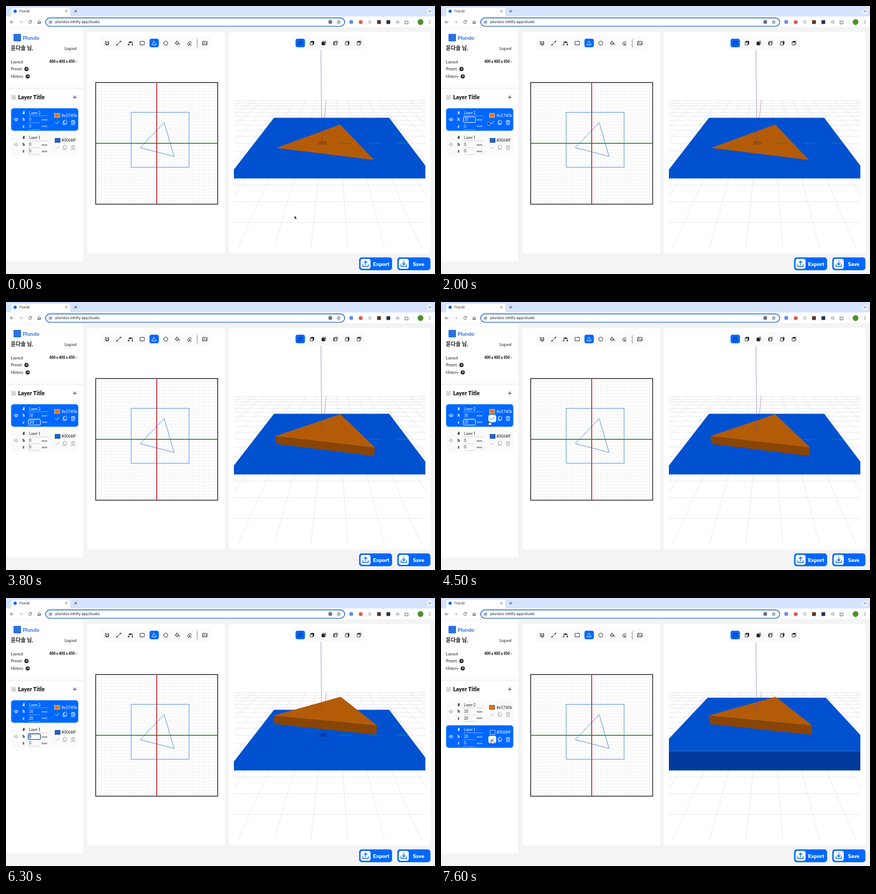
These frames come from a looping animation (800x500 px, 8.73 s). An HTML page:

```html
<!DOCTYPE html>
<html lang="en">
<head>
<meta charset="utf-8">
<title>Plundo</title>
<style>
  html, body { margin: 0; width: 100%; height: 100%; overflow: hidden; background: #f4f4f5; }
  svg { display: block; width: 100vw; height: 100vh; }
  text { font-family: Lato, "Noto Sans CJK KR", "Noto Sans CJK", sans-serif; white-space: pre; }
  .ui { font-family: Inter, Roboto, sans-serif; }
</style>
</head>
<body>
<svg id="stage" viewBox="0 0 800 500" xmlns="http://www.w3.org/2000/svg">
  <defs><clipPath id="view"><rect x="425" y="82" width="357" height="370"/></clipPath></defs>
  <g id="chrome"></g>
  <g id="page"></g>
  <g id="scene" clip-path="url(#view)"></g>
  <g id="cards"></g>
  <g id="pointer"></g>
</svg>
<script>
const LOOP = 8730, STEP = 100;
const BLUE = '#0068ff', INK = '#1c1c24';
const $ = id => document.getElementById(id);

// ---- drawing helpers ----
const rect = (x, y, w, h, fill, r = 0, more = '') =>
  `<rect x="${x}" y="${y}" width="${w}" height="${h}" rx="${r}" fill="${fill}" ${more}/>`;
const circle = (x, y, r, fill, more = '') => `<circle cx="${x}" cy="${y}" r="${r}" fill="${fill}" ${more}/>`;
const stroke = (d, color, w = 1, more = '') =>
  `<path d="${d}" fill="none" stroke="${color}" stroke-width="${w}" ${more}/>`;
const shape = (d, fill, more = '') => `<path d="${d}" fill="${fill}" ${more}/>`;
const text = (x, y, size, str, fill = INK, weight = 400, more = '') =>
  `<text x="${x}" y="${y}" font-size="${size}" font-weight="${weight}" fill="${fill}" ${more}>${str}</text>`;
const at = (x, y, body) => `<g transform="translate(${x} ${y})">${body}</g>`;
const ROUND = 'stroke-linecap="round" stroke-linejoin="round"';
const icon = (x, y, d, color = INK, w = .9) => at(x, y, stroke(d, color, w, ROUND));

// ---- browser frame ----
function drawChrome() {
  const g = '#45484d';
  return rect(0, 0, 800, 20, '#d5e3fc') +
    shape('M7 20Q10 20 10 16V8Q10 3.500 14.500 3.500H116Q120 3.500 120 8V16Q120 20 123 20Z', '#fff') +
    circle(17, 9.800, 3, BLUE) +
    text(25, 12, 6, 'Plundo', '#333', 400, 'class="ui"') +
    icon(112.500, 9.700, 'M-1.800-1.800 1.800 1.800M1.800-1.800-1.800 1.800', g, .8) +
    icon(130, 9.700, 'M-2.700 0H2.700M0-2.700V2.700', g, .9) +
    circle(790.500, 9.700, 6, '#e6effd') +
    icon(790.500, 9.700, 'M-2-1 0 1 2-1', g, 1) +
    rect(0, 19.500, 800, 21, '#fff') + rect(0, 40.500, 800, .7, '#e3e5e8') +
    icon(10.500, 30, 'M2.800 0H-2.600M0-2.600-2.600 0 0 2.600', g) +
    icon(28, 30, 'M-2.800 0H2.600M0-2.600 2.600 0 0 2.600', '#b0b3b7') +
    icon(45, 30, 'M2.300-1.500A2.700 2.700 0 1 0 2.600.8M2.600-3V-1.200H.8', g) +
    icon(62, 30, 'M-2.500 2.700V-.6L0-2.800 2.500-.6V2.700H.8V.6H-.8V2.700Z', g) +
    rect(74, 22.300, 557.500, 15.600, '#fff', 7.800, 'stroke="#1f63c4" stroke-width="1.400"') +
    circle(83, 30, 5, '#eef1f6') +
    icon(83, 30, 'M-2.500-1.300H.3M1.800-1.300H2.500M-2.500 1.400H-1.800M-.3 1.400H2.500', g, .8) +
    circle(84, 28.700, .8, 'none', `stroke="${g}" stroke-width=".7"`) +
    circle(82, 31.400, .8, 'none', `stroke="${g}" stroke-width=".7"`) +
    text(92, 32.400, 6.750, 'plundos.netlify.app/studio', '#222', 400, 'class="ui"') +
    rect(601.500, 26.500, 6.500, 6.500, '#6b7078', 1) +
    icon(620.500, 30, 'M0-3.200 .9-1 3.200-.9 1.400.6 2 2.900 0 1.600-2 2.900-1.400.6-3.200-.9-.9-1Z', g, .8) +
    rect(640.500, 26.500, 6.500, 6.500, '#5b8def', 1) +
    circle(661.500, 30, 3.600, '#de5748') +
    circle(678.500, 30, 3.400, '#d5d7da') +
    rect(692, 26.500, 7, 7, '#5b361e') +
    rect(709.500, 26.500, 7, 7, '#20344a') +
    rect(727, 27, 6.500, 6, '#c9ccd0', 1) +
    icon(747, 30.300, 'M-3-2H-1A1.100 1.100 0 0 1 1.100-2H2.700V-.3A1.100 1.100 0 0 1 2.700 1.600V3H-3V1.200A1 1 0 0 0-3-.6Z', g, .9) +
    rect(760, 26, .8, 8, '#c9dafa') +
    circle(773, 30, 5.400, '#4d8f2c') +
    [-2.600, 0, 2.600].map(d => circle(790.500, 30 + d, .75, g)).join('');
}

// ---- fixed page parts ----
const TOOLS = [
  'M-3-3.500-1.500-2H1.500L3-3.500V-.5A3 3.200 0 0 1-3-.5ZM-3.500.5-2 1.500V3.500H2V1.500M-1-.5V0M1-.5V0M2.500 2.500 4 1',
  'M-2.300 2.300 2.300-2.300M-4 2.600H-2.600V4H-4ZM2.600-4H4V-2.600H2.600Z',
  'M-3.500 2.500Q-3.500-1.500 0-1.500T3.500 2.500M-4-2H4M-1-2.600H1V-1H-1ZM-4.200 2.300H-2.800V3.600H-4.200ZM2.800 2.300H4.200V3.600H2.800Z',
  'M-3.800-3.300H3.800V3.300H-3.800Z',
  'M0-3.600 4 3.400H-4Z',
  'M-3.800 0A3.800 3.800 0 1 1 3.800 0A3.800 3.800 0 1 1-3.800 0Z',
  'M-.8-3.500 3 .2-.8 3.600-4 .4ZM-4 .4H2.800M-2.200-4-.8-2.500M4 1.800V3.300',
  'M-3.800 1.200 1-3.600 3.800-.8-.6 3.500H-1.600ZM-1.400-1.200 1.400 1.600M-.6 3.500H3.800'
];

function drawTools() {
  let s = rect(176, 57.500, 207, 23.500, '#fafafa', 4) + rect(267.500, 61, 17.500, 16, BLUE, 4);
  TOOLS.forEach((d, i) => s += icon(188.500 + 21.900 * i, 69.300, d, i === 4 ? '#fff' : INK));
  s += rect(356, 62, .9, 15, '#777') +
    icon(371, 69.300, 'M-4-3.300H4V3.300H-4ZM-4 2-1-.6 1 1.200 2.300 0 4 1.700M-2-1.500H-1.800');
  s += rect(537, 57.500, 133, 23.500, '#fafafa', 4) + rect(540, 61, 17.500, 16, BLUE, 4);
  const cube = 'M-3.500-1.800-1.700-3.500H3.500V1.700L1.700 3.500H-3.500ZM-3.500-1.800H1.700V3.500M1.700-1.800 3.500-3.500';
  const faces = ['', 'M-3.500-1.800-1.700-3.500H3.500V1.700L1.700 3.500V-1.800Z', 'M-3.500-1.800H1.700V3.500H-3.500Z',
    'M-3.500-1.800-2-3.200V2L-3.500 3.500Z', 'M1.700-1.800 3.500-3.500V1.700L1.700 3.500Z', 'M-3.500-1.800-1.700-3.500H3.500L1.700-1.800Z'];
  faces.forEach((f, i) => {
    const ink = i ? INK : '#0a2a66';
    s += at(548.700 + 21.900 * i, 69.300, shape(f, ink) + stroke(cube, ink, .8));
  });
  return s;
}

function drawPlan() {
  let d = '';
  for (let i = 1; i < 40; i++) d += `M${167 + i * 5.690} 143V370M167 ${142.500 + i * 5.690}H395`;
  return stroke(d, '#ebebeb', .6) +
    rect(233.300, 198.300, 108, 102.500, 'none', 0, 'stroke="#4f90ea" stroke-width="1"') +
    stroke('M295 217.300 313.300 280.500 250.300 264.300Z', '#4f90ea', 1) +
    rect(167.300, 142.700, 227.400, 227, 'none', 0, 'stroke="#2d2838" stroke-width="1.500"') +
    stroke('M168 256.300H394', '#0f8410', 1.600) + stroke('M281 143.500V369', '#cc1720', 1.600);
}

function bigButton(x, w, label, tx, arrow) {
  return rect(x, 469, w, 24, BLUE, 5) + rect(x + 2.700, 471.700, 18.600, 18.600, '#fff', 4) +
    icon(x + 12, 481, 'M-5 1.500V5H5V1.500' + arrow, BLUE, 1.400) +
    text(tx, 484.500, 10, label, '#fff', 900);
}

function drawPage() {
  const link = (x, y) => circle(x, y, 3.900, '#24242c') + icon(x, y, 'M-1.200 1.200 1.300-1.300M-.7-1.300H1.300V.7', '#fff', .8);
  return rect(0, 41, 800, 459, '#f4f4f5') +
    rect(0, 41, 144, 436, '#fff') + rect(0, 152, 144, 3, '#f4f4f5') +
    rect(14, 52, 14, 14, '#2b73e0', 1) +
    text(31, 62.800, 10, 'Plundo', '#2b73e0', 700) +
    text(9, 82, 10, '윤다솔 님,', INK, 700) +
    text(109, 81.500, 7.500, 'Logout') +
    text(9, 106.500, 7.600, 'Layout') +
    text(81, 106, 6.500, '400 x 400 x 450', INK, 900) +
    icon(131, 104, 'M-1.600-.8 0 .8 1.600-.8', INK, .7) +
    text(9, 120.300, 7.400, 'Preset') + link(38.200, 117.500) +
    text(9, 134.200, 7.200, 'History') + link(40.500, 131.300) +
    icon(14.300, 170.300, 'M0-3.200H-3.300V3.300H3.300V0M-1.300 1.300-1 0 2.800-3.600 3.700-2.700 0 1Z', '#888', .8) +
    text(22.500, 174, 10.600, 'Layer Title', INK, 900) +
    icon(128.300, 170.300, 'M-2.900 0H2.900M0-2.900V2.900', INK, .9) +
    rect(151.500, 48.500, 257, 413.500, '#fff', 5) + rect(415.500, 48.500, 376, 413.500, '#fff', 5) +
    drawTools() + drawPlan() +
    bigButton(658.500, 61.500, 'Export', 684.500, 'M0 2V-5M-2.800-2.300 0-5 2.800-2.300') +
    bigButton(729.700, 61.800, 'Save', 759, 'M0-5V2M-2.800-.7 0 2 2.800-.7');
}

// ---- 3D view: millimetres on the floor plus a height ----
function project(x, z, h = 0) {
  const floor = .662 - .00219 * z, w = floor - .00115 * h;
  return [(608.500 * floor + x - 12.900 - .685 * h) / w, (68 * floor + 124.400 - 1.210 * h) / w];
}
const poly = pts => 'M' + pts.map(p => p.map(v => v.toFixed(1)).join(' ')).join('L') + 'Z';
const span = (a, b) => 'M' + a.join(' ') + 'L' + b.join(' ');

const SLAB = [[-83.400, -102], [106.800, -102], [106.800, 78.400], [-83.400, 78.400]];
const WEDGE = [[24.700, -68.700], [57, 43.200], [-53.100, 13.500]];

function prism(base, z, h, top, side) {
  const n = base.length, up = base.map(([x, y]) => project(x, y, z + h));
  const front = [project(...base[n - 2], z), project(...base[n - 1], z), up[n - 1], up[n - 2]];
  return (h ? shape(poly(front), side) : '') + shape(poly(up), top);
}

function drawFloor() {
  const cell = 22.200, back = -10 * cell;
  let d = '';
  for (let i = -10; i <= 6; i++) d += span(project(-10 * cell, i * cell), project(10 * cell, i * cell));
  for (let i = -10; i <= 10; i++) d += span(project(i * cell, back), project(i * cell, 165));
  return stroke(d, '#d9d9db', .65) + stroke(span(project(0, back), project(0, -100)), '#c78f98', .8);
}
const floorArt = drawFloor();

function drawScene(t) {
  const [h, z] = pick(SOLID, t), slabH = pick(SLAB_H, t);
  const slab = prism(SLAB, 0, slabH, '#0051d0', '#003b9c');
  const wedge = prism(WEDGE, z, h, '#b45b08', '#8a4504');
  const marks = slabH ? '' :
    stroke('M623 256.300H644M729.500 256.300H750', '#0b8f42', 1.600, 'opacity=".85"') +
    stroke('M676 256.300H699', '#1f6fc0', 1.300, 'opacity=".8"') +
    stroke('M473 270H497', '#3a3a90', .8, 'opacity=".5"') +
    shape('M584 252.300H598.500L597 259H581.500Z', h ? '#0c3ea6' : '#964d08');
  const foot = project(0, 0, h + z);
  return floorArt + slab + (h ? marks + wedge : wedge + marks) +
    stroke(`M587.200 82L${foot.join(' ')}`, '#4a48a8', .7, 'opacity=".75"');
}

// ---- timetable: [from ms, value] ----
const SOLID = [[0, [0, 0]], [2600, [10, 0]], [4800, [10, 20]]];
const SLAB_H = [[0, 0], [7500, 20]];
const ACTIVE = [[0, 2], [7300, 1]];
const FOCUS = [[0, ''], [1000, 'h2'], [2600, ''], [3200, 'z2'], [4800, ''], [5900, 'h1'], [7300, '']];
const FIELDS = {
  h2: [[0, '0'], [1500, '10']],
  z2: [[0, '0'], [3500, '2'], [3800, '20']],
  h1: [[0, '0'], [6400, '2'], [6600, '20'], [7300, '0'], [7500, '20']],
  z1: [[0, '0']]
};
const SHOWN = [[0, 1], [1500, 0], [1900, 1], [3500, 0], [4000, 1], [6300, 0], [6800, 1]];
const PATH = [[0, 538, 391], [900, 52, 212], [1800, 52, 212], [2000, 87, 216], [2300, 93, 220], [2900, 93, 220],
  [3200, 52, 225], [4000, 52, 225], [4400, 90, 222], [5100, 90, 222], [5800, 52, 259], [6800, 52, 259],
  [7200, 95, 264], [LOOP, 95, 264]];

const entry = (table, t) => table.filter(row => row[0] <= t).pop();
const pick = (table, t) => entry(table, t)[1];

function pointerAt(t) {
  const i = PATH.findIndex(k => k[0] > t), a = PATH[i - 1], b = PATH[i];
  const u = (t - a[0]) / (b[0] - a[0]), e = u * u * (3 - 2 * u);
  return [a[1] + (b[1] - a[1]) * e, a[2] + (b[2] - a[2]) * e];
}
const CARD_Y = { 2: 0, 1: 46.700 };
const overCheck = (x, y, n) => {
  const dy = CARD_Y[n];
  return x >= 88 && x <= 103 && y >= 210 + dy && y <= 225 + dy;
};

// ---- layer cards ----
function drawField(key, y, t, on) {
  const [since, value] = entry(FIELDS[key], t), ink = on ? '#fff' : INK;
  if (pick(FOCUS, t) !== key) {
    return rect(42, y + 3.500, 22, .6, on ? '#b8d4ff' : '#bbb') + text(43, y, 6.600, value, ink);
  }
  const began = entry(FOCUS, t)[0], typed = since >= began;
  const caretX = 43.300 + value.length * 3.830;
  return rect(41.500, y - 7.300, 22.800, 10.400, on ? 'none' : '#fff', 2,
      on ? 'stroke="#fff" stroke-width="1"' : 'stroke="#17539f" stroke-width="1.300"') +
    (typed ? '' : rect(42.700, y - 5.800, 4.400, 7.600, on ? '#6fa8ff' : '#b4d3fb')) +
    text(43, y, 6.600, value, ink) +
    (typed && (t - since) % 1000 < 500 ? rect(caretX, y - 5.800, .7, 7.200, ink) : '');
}

function drawCard(n, t, mouse) {
  const on = pick(ACTIVE, t) === n, ink = on ? '#fff' : INK, soft = on ? '#fff' : '#a9a9ad';
  const hover = mouse && overCheck(...mouse, n);
  const color = n === 2 ? '#e5740b' : '#0068ff';
  const label = (y, s) => text(31, y, 7.200, s, ink, 900);
  const body = rect(9.500, 190.800, 125.300, 42, on ? BLUE : '#fafafa', 5) +
    icon(19, 211.800, 'M-4 0Q0-5.600 4 0Q0 5.600-4 0ZM-1.400 0A1.400 1.400 0 1 1 1.400 0A1.400 1.400 0 1 1-1.400 0', soft, .8) +
    label(201.700, '#') + label(214.300, 'h') + label(226.600, 'z') +
    text(43, 201.500, 6.700, 'Layer ' + n, ink) +
    rect(42, 204.600, 37, .6, on ? '#b8d4ff' : '#bbb') +
    drawField('h' + n, 214.100, t, on) + drawField('z' + n, 226.500, t, on) +
    text(66.500, 214, 6.300, 'mm', ink) + text(66.500, 226.400, 6.300, 'mm', ink) +
    rect(n === 2 ? 90.500 : 91.500, 200.200, 9.500, 7.600, color, 0,
      `stroke="${on ? '#cfe0ff' : '#333'}" stroke-width=".8"`) +
    text(103.500, 206.700, 7.300, color, ink) +
    (hover ? rect(88.300, 210.300, 14.500, 14, '#fff', 4) : '') +
    icon(95.500, 217.300, 'M-3.300 0-1 2.400 3.400-2.400', hover && on ? BLUE : soft, .9) +
    icon(110, 217.300, 'M-1.700-4H1.500L3.200-2.200V2.200H-1.700ZM-1.700-2.400H-3.200V4H1.500V2.200', soft, .8) +
    icon(125, 217.300, 'M-3.700-2.600H3.700M-1.300-2.600V-4H1.300V-2.600M-2.900-2.600V4H2.900V-2.600M-.9-.6V2.200M.9-.6V2.200', soft, .8);
  return at(0, CARD_Y[n], body);
}

// ---- mouse pointer ----
function drawPointer(x, y) {
  const inField = x > 41 && x < 64.500 && y > 206 && y < 276;
  if (inField) return icon(x, y, 'M-1.300-3.600Q0-3.600 0-2.800Q0-3.600 1.300-3.600M0-2.800V2.800M-1.300 3.600Q0 3.600 0 2.800Q0 3.600 1.300 3.600', '#222', .8);
  if (overCheck(x, y, 2) || overCheck(x, y, 1)) {
    return at(x, y, shape('M-.9 .6Q0-.6 .8 .6V3Q1.700 2.500 2.200 3.300Q3.200 2.900 3.500 3.700Q4.500 3.600 4.400 4.700L3.700 8H-.4L-2.500 5Q-2.500 3.900-.9 4.900Z',
      '#fff', 'stroke="#111" stroke-width=".7" stroke-linejoin="round"'));
  }
  return at(x, y, shape('M0 0V6.700L1.500 5.300 2.600 7.900 3.700 7.400 2.600 4.900H4.600Z',
    '#111', 'stroke="#fff" stroke-width=".5" stroke-linejoin="round"'));
}

// ---- playback ----
$('chrome').innerHTML = drawChrome();
$('page').innerHTML = drawPage();

const start = performance.now();
let last = -1;
function frame() {
  const elapsed = Math.max(0, performance.now() - start) % LOOP;
  const t = Math.floor(elapsed / STEP) * STEP;
  if (t !== last) {
    last = t;
    const mouse = pick(SHOWN, t) ? pointerAt(t) : null;
    $('scene').innerHTML = drawScene(t);
    $('cards').innerHTML = drawCard(2, t, mouse) + drawCard(1, t, mouse);
    $('pointer').innerHTML = mouse ? drawPointer(...mouse) : '';
  }
  requestAnimationFrame(frame);
}
frame();
</script>
</body>
</html>
```
